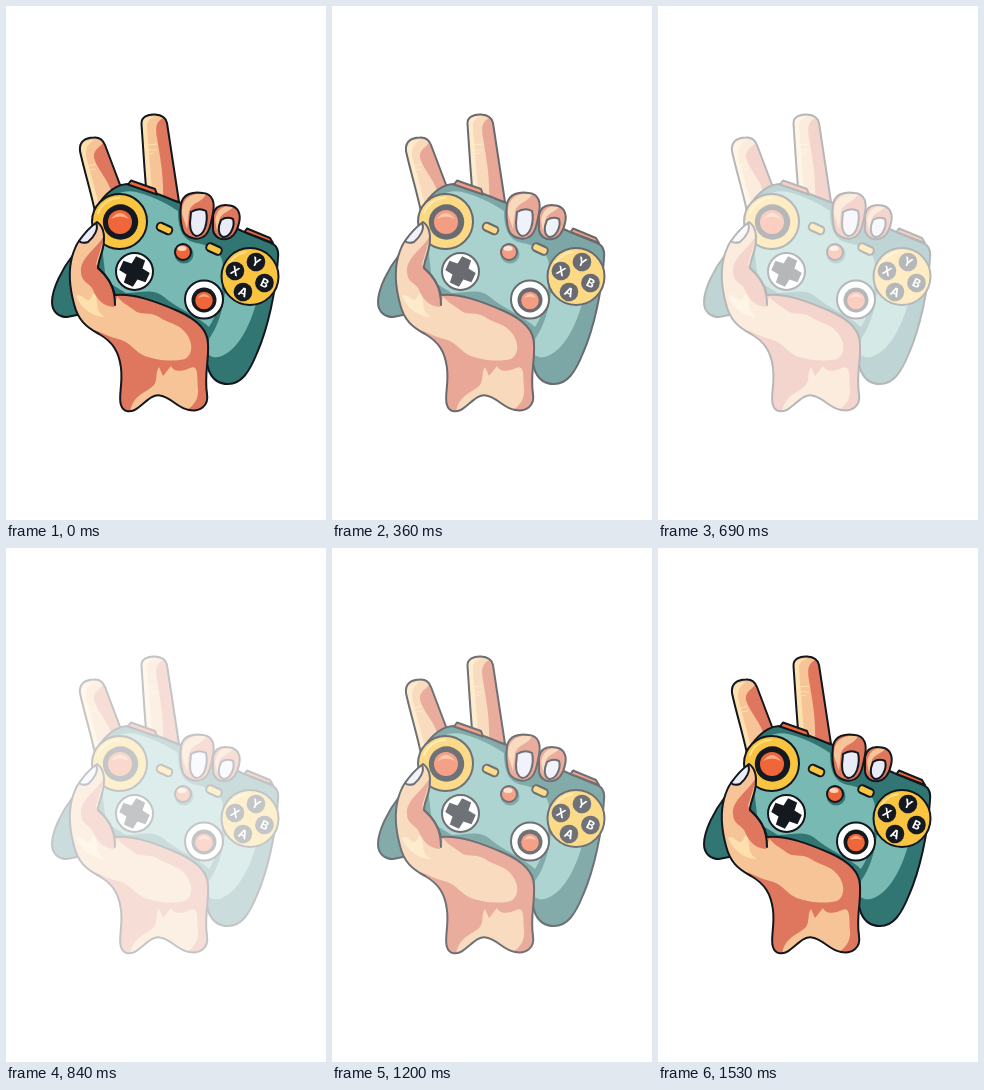
Recreate the animation shown at these times as an HTML page. Size 320x514 px, loop 1560 ms.

```html
<!DOCTYPE html>
<html lang="en">
<head>
<meta charset="utf-8">
<title>Controller in hand</title>
<style>
  html, body { margin: 0; width: 100%; height: 100%; overflow: hidden; background: #fff; }
  svg { display: block; width: 100vw; height: 100vh; }
  .ink { stroke: #12161d; stroke-width: 2; stroke-linejoin: round; stroke-linecap: round; }
  .line { fill: none; }
  .skin { fill: #f6c496; }
  .glow { fill: #fde0ae; }
  .shade { fill: #de775d; }
  .teal { fill: #327674; }
  .face { fill: #79b9b3; }
  .gold { fill: #f9c440; }
  .red { fill: #f0663b; }
  .dark { fill: #14181f; }
  .nail { fill: #e9ebf7; }
  .crease { fill: none; stroke: #fde0ae; }
  text { font: bold 12px Inter, Arial, sans-serif; fill: #fff; text-anchor: middle; }
</style>
</head>
<body>
<svg viewBox="0 0 320 514">
  <defs>
    <path id="index" d="M89 206 C86 190 77 160 74 145 C73 135 79 132 88 131.500 C94 131 97 134 99 139 L116 184 L112 206Z"/>
    <path id="middle" d="M141 195 C139 170 137 142 135.500 118 C135 111 142 108 149 108.500 C157 109 160 112 161 117 L173 196Z"/>
    <path id="body" d="M88 208 C93 194 106 179 121 178 C140 182 158 191 175 197 L236 225 L264 236.500 C271 239 273 244 272 252 C270 285 262 322 251 347 C243 367 235 378 222 378 C212 378 206 372 203 365 L196 340 L95 300Z"/>
    <path id="hand" d="M91 216 C97 220 99 228 97.500 239 C96 249 92 255 92 262 C100 269 107 279 109 289 C128 287 151 296 172 305 C190 313 202 323 202 338 C203 356 198 369 201 388 C203 400 194 406 183 404 C171 402 165 391 154 389.500 C146 388 140 396 133 401 C125 408 117 406 115 399 C112 391 117 379 115 362 C113 346 107 336 93 328 C80 321 72 314 68 298 C64 283 62 266 66 251 C68 244 70 239 73 235 C79 227 85 221 91 216Z"/>
    <path id="hookA" d="M175 198 C177 188 187 185 197 187 C207 188 209 197 207 207 C205 218 203 228 197 231 C190 235 180 231 177 225 C174 216 174 206 175 198Z"/>
    <path id="hookB" d="M207 209 C209 200 216 198 224 199.500 C233 201 235 209 233 217 C231 226 227 232 220 233 C213 234 208 230 207 224Z"/>
    <clipPath id="cIndex"><use href="#index"/></clipPath>
    <clipPath id="cMiddle"><use href="#middle"/></clipPath>
    <clipPath id="cBody"><use href="#body"/></clipPath>
    <clipPath id="cHand"><use href="#hand"/></clipPath>
    <clipPath id="cHookA"><use href="#hookA"/></clipPath>
    <clipPath id="cHookB"><use href="#hookB"/></clipPath>
  </defs>

  <g id="art">
    <!-- raised fingers -->
    <use href="#index" class="skin"/>
    <g clip-path="url(#cIndex)">
      <path class="glow" d="M73 145 Q76 133 88 134 Q79 139 80 150 L94 202 L86 202Z"/>
      <path class="shade" d="M99 135 C93 142 87 144 88 152 C92 165 103 174 107 190 L122 190Z"/>
      <path class="crease" d="M82 160 l8 -2 M83 164 l7 -1"/>
    </g>
    <use href="#index" class="ink line"/>

    <use href="#middle" class="skin"/>
    <g clip-path="url(#cMiddle)">
      <path class="glow" d="M134 118 Q137 109 150 111 Q140 112 141 122 L146 185 L139 185Z"/>
      <path class="shade" d="M160 111 C150 114 149 121 151 132 C154 151 158 169 157 196 L176 196 L163 113Z"/>
      <path class="crease" d="M141 139 l10 -1 M142 144 l9 0 M142 148 l6 -1"/>
    </g>
    <use href="#middle" class="ink line"/>

    <!-- controller -->
    <path class="teal ink" d="M67 249 C56 263 46 283 46 296 C46 307 54 311 61 311 L76 308 L82 260Z"/>
    <use href="#body" class="teal"/>
    <g clip-path="url(#cBody)">
      <path class="face" d="M92 206 C101 190 117 183 130 186 C150 191 163 199 172 205 C172 222 176 234 190 237 C206 240 217 247 217 260 L216 282 C214 296 211 308 203 321 C193 311 169 301 158 291 C147 282 134 287 120 287 L100 275Z"/>
      <path class="face" d="M219 286 C228 298 240 301 250 298 C244 318 236 335 224 345 C215 352 208 353 203 349 L203 333 C211 322 217 305 219 286Z"/>
    </g>
    <use href="#body" class="ink line"/>
    <path class="red ink" d="M122 178.500 L125 174.500 L149 183 L151 188.500Z M238.500 226 L241 222.500 L264 232 L267 237Z"/>

    <circle class="gold ink" cx="113.500" cy="215.500" r="27.500"/>
    <path d="M92 207 A23 23 0 0 1 113 192" fill="none" stroke="#fde08a" stroke-width="2" stroke-linecap="round"/>
    <circle class="dark" cx="114.500" cy="216" r="17.700"/>
    <circle class="red" cx="114" cy="216" r="12"/>
    <path d="M105 213 Q114 201 123 213 Q114 208 105 213Z" fill="#ffab83"/>

    <circle class="ink" cx="128.500" cy="265.500" r="18.500" fill="#fff"/>
    <path class="dark" transform="translate(128.500 265.500) rotate(25)" d="M-5 -14.500 h10 l1 8.500 l8.500 1 v10 l-8.500 1 l-1 8.500 h-10 l-1 -8.500 l-8.500 -1 v-10 l8.500 -1Z"/>

    <circle class="ink" cx="198" cy="293.500" r="19" fill="#fff"/>
    <circle class="dark" cx="198" cy="294" r="12.500"/>
    <circle class="red" cx="198" cy="294.500" r="8.800"/>
    <path d="M192 292 Q198 284 204 292 Q198 289 192 292Z" fill="#ffab83"/>

    <circle class="teal" cx="178" cy="248" r="9.500"/>
    <circle class="red ink" cx="177" cy="246" r="8"/>
    <ellipse cx="176" cy="242.500" rx="4.500" ry="2.500" fill="#ffd6b8"/>
    <g class="gold ink">
      <rect x="-8" y="-4" width="16" height="8" rx="3.500" transform="translate(158.500 222.500) rotate(25)"/>
      <rect x="-8" y="-4" width="16" height="8" rx="3.500" transform="translate(208 243) rotate(25)"/>
    </g>

    <circle class="gold ink" cx="244" cy="270.500" r="28.500"/>
    <path d="M221 262 A25 25 0 0 1 240 246" fill="none" stroke="#fde08a" stroke-width="2" stroke-linecap="round"/>
    <g id="keys"></g>

    <!-- hand -->
    <use href="#hand" class="skin"/>
    <g clip-path="url(#cHand)">
      <path class="glow" d="M70 290 C74 286 79 295 83 294 C87 292 85 287 89 288 C93 295 88 305 99 311 C88 311 76 304 70 290Z"/>
      <path class="shade" d="M101 222 C97 239 78 247 75 262 C74 276 82 276 86 282 C90 291 95 300 108 301 L112 288 L90 258Z"/>
      <path class="shade" d="M109 287 C115 297 122 299 128 304 C134 310 144 305 153 311 C161 317 171 317 178 325 C187 334 188 348 179 353 C166 356 151 354 142 351 C128 347 126 336 112 333 C102 331 96 326 88 324 L110 350 L110 410 L124 407 C126 389 140 387 148 379 C152 373 149 367 153 361 L157 370 L165 360 C168 367 178 365 184 362 C193 358 191 371 192 382 C193 393 188 399 181 404 L206 408 L206 325 L172 300 L125 283Z"/>
    </g>
    <use href="#hand" class="ink line"/>
    <path class="ink line" d="M92 262 C101 270 109 280 109 299"/>
    <path class="nail ink" d="M90 217 C93 223 88 231 82 236 Q76 238 73 235 C78 228 84 221 90 217Z"/>

    <!-- fingers over the top -->
    <use href="#hookB" class="shade"/>
    <path class="skin" clip-path="url(#cHookB)" d="M209 214 C211 203 218 198 227 201 C223 206 217 206 214 212 L211 225Z"/>
    <use href="#hookB" class="ink line"/>
    <path class="nail ink" d="M215 214 Q221 210 227 213 Q229 219 225 226 Q222 231 217 231 Q212 229 213 220Z"/>

    <use href="#hookA" class="shade"/>
    <path class="skin" clip-path="url(#cHookA)" d="M176 208 C175 192 185 186 200 188 C196 197 187 195 183 205 L181 223Z"/>
    <use href="#hookA" class="ink line"/>
    <path class="nail ink" d="M185 206 Q193 201 200 205 Q202 213 199 222 Q196 230 190 230 Q184 228 184 217Z"/>
  </g>
</svg>
<script>
  const keys = [["X", 229, 265], ["Y", 250, 256], ["B", 258.5, 277], ["A", 237, 286]];
  document.getElementById("keys").innerHTML = keys.map(([label, x, y]) =>
    `<g transform="translate(${x} ${y}) rotate(25)"><circle class="dark" r="9.3"/><text y="4.2">${label}</text></g>`
  ).join("");

  const LOOP = 1560;
  const fade = [[0, 1], [120, .88], [360, .64], [690, .31], [825, .24], [960, .3], [1200, .61], [1530, 1], [LOOP, 1]];
  document.getElementById("art").animate(
    fade.map(([ms, opacity]) => ({ offset: ms / LOOP, opacity })),
    { duration: LOOP, iterations: Infinity }
  );
</script>
</body>
</html>
```
